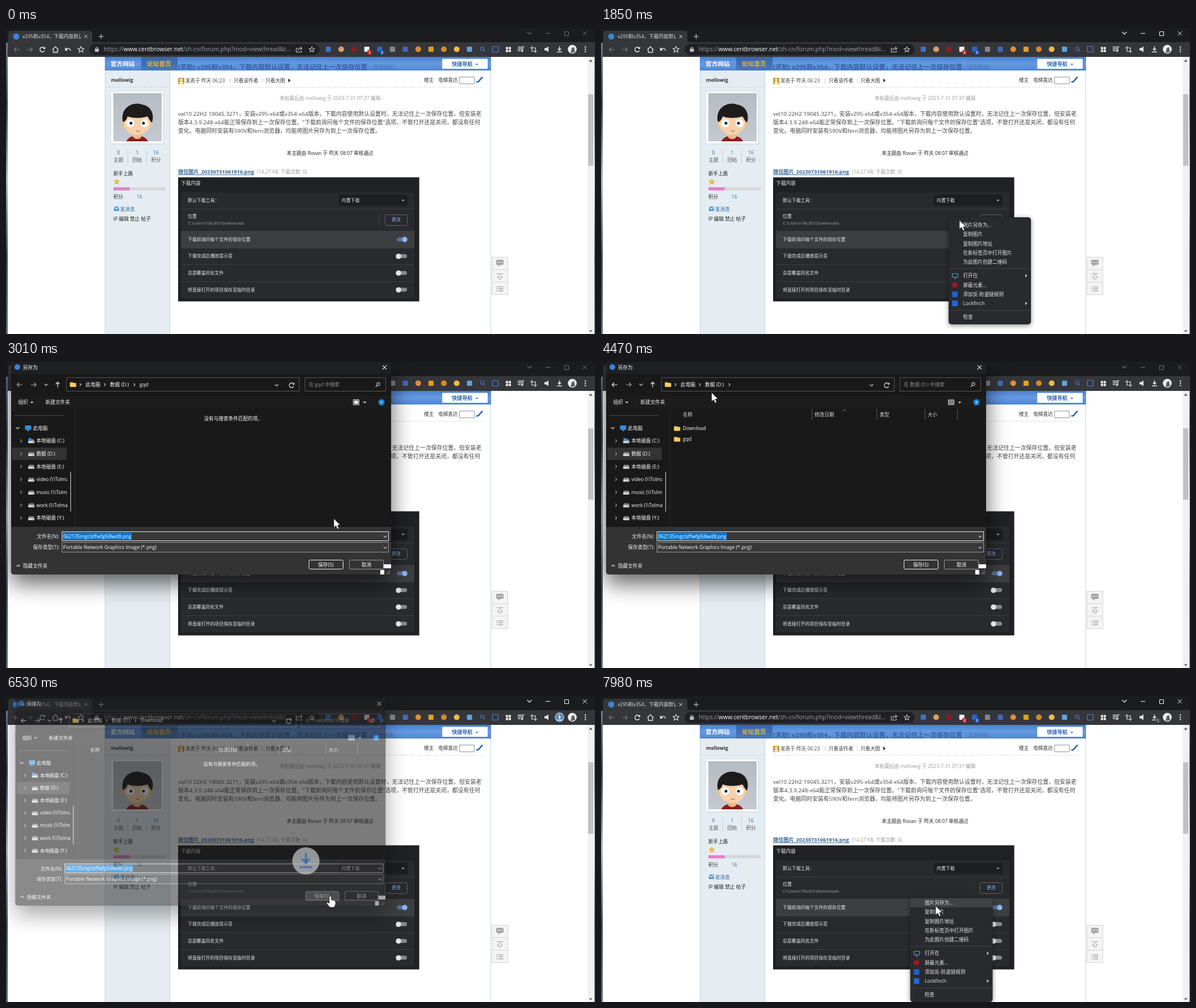
These frames come from a looping animation (1037x540 px, 8 s). An HTML page with a canvas:

```html
<!DOCTYPE html>
<html lang="zh-CN">
<head>
<meta charset="utf-8">
<title>Save dialog demo</title>
<style>
html, body { margin: 0; width: 100%; height: 100%; overflow: hidden; background: #fff; }
canvas { display: block; width: 1037px; height: 540px; }
</style>
</head>
<body>
<canvas id="stage"></canvas>
<script>
const W = 1037, H = 540, LOOP = 8000;
const FONT = '"Open Sans", "Noto Sans CJK SC", "Noto Sans CJK JP", "Noto Sans CJK", sans-serif';
const dpr = window.devicePixelRatio || 1;

function prepare(c) {
  c.width = W * dpr;
  c.height = H * dpr;
  return c.getContext('2d');
}
const stage = document.getElementById('stage');
const layer = document.createElement('canvas');
const main = prepare(stage), sub = prepare(layer);
let g = main;

// ---- drawing helpers ----
// y is the visual middle of the glyphs
function txt(s, x, y, size, color, weight = 400, align = 'left') {
  g.font = `${weight} ${size}px ${FONT}`;
  g.textAlign = align;
  g.fillStyle = color;
  g.fillText(s, x, y + size * 0.36);
  return g.measureText(s).width;
}
function shape(x, y, w, h, r) {
  g.beginPath();
  g.roundRect(x, y, w, h, r);
}
function box(x, y, w, h, color, r = 0) {
  shape(x, y, w, h, r);
  g.fillStyle = color;
  g.fill();
}
function frame(x, y, w, h, color, r = 0, lw = 1) {
  shape(x + 0.5, y + 0.5, w - 1, h - 1, r);
  g.strokeStyle = color;
  g.lineWidth = lw;
  g.stroke();
}
function dot(x, y, r, color) {
  g.beginPath();
  g.arc(x, y, r, 0, 7);
  g.fillStyle = color;
  g.fill();
}
function ring(x, y, r, color, lw = 1, from = 0, to = 6.3) {
  g.beginPath();
  g.arc(x, y, r, from, to);
  g.strokeStyle = color;
  g.lineWidth = lw;
  g.stroke();
}
// p is a flat list of offsets from x, y
function trace(x, y, p) {
  g.beginPath();
  for (let i = 0; i < p.length; i += 2) g.lineTo(x + p[i], y + p[i + 1]);
}
function line(x, y, p, color, lw = 1) {
  trace(x, y, p);
  g.strokeStyle = color;
  g.lineWidth = lw;
  g.stroke();
}
function poly(x, y, p, color) {
  trace(x, y, p);
  g.fillStyle = color;
  g.fill();
}
function vgrad(y0, y1, ...stops) {
  const gr = g.createLinearGradient(0, y0, 0, y1);
  stops.forEach((c, i) => gr.addColorStop(i / (stops.length - 1), c));
  return gr;
}
function dashed(x0, x1, y, color) {
  g.setLineDash([2, 2]);
  line(x0, y + 0.5, [0, 0, x1 - x0, 0], color);
  g.setLineDash([]);
}
function star(x, y, r, color, fill) {
  const p = [];
  for (let i = 0; i <= 10; i++) {
    const a = i * Math.PI / 5, q = i % 2 ? r * 0.45 : r;
    p.push(q * Math.sin(a), -q * Math.cos(a));
  }
  if (fill) poly(x, y, p, fill);
  line(x, y, p, color, 1.1);
}
const cross = (x, y, r, c, lw = 1) => {
  line(x, y, [-r, -r, r, r], c, lw);
  line(x, y, [r, -r, -r, r], c, lw);
};
const arrow = (x, y, dir, c) => {
  const s = 4.5 * dir;
  line(x, y, [-s, 0, s, 0], c, 1.2);
  line(x, y, [s - 3.5 * dir, -3.5, s, 0, s - 3.5 * dir, 3.5], c, 1.2);
};
const caret = (x, y, c, s = 3) => poly(x, y, [-s, -s / 2, s, -s / 2, 0, s / 2], c);
const chevron = (x, y, c, s = 3) => line(x, y, [-s, -s / 2, 0, s / 2, s, -s / 2], c, 1.1);
const chevRight = (x, y, c, s = 3) => line(x, y, [-s / 2, -s, s / 2, 0, -s / 2, s], c, 1.1);
const lens = (x, y, c) => {
  ring(x, y - 1, 3, c, 1.2);
  line(x, y, [2, 1.2, 4.5, 3.8], c, 1.3);
};
function reload(x, y, c) {
  ring(x, y, 4.2, c, 1.4, 0.5, 5.6);
  poly(x, y, [1, -1, 5, -1, 5, -5], c);
}
function download(x, y, c, s = 1) {
  line(x, y, [0, -5 * s, 0, 2 * s], c, 1.5 * s);
  poly(x, y, [-3.6 * s, -1 * s, 3.6 * s, -1 * s, 0, 3 * s], c);
  line(x, y, [-4.5 * s, 4.8 * s, 4.5 * s, 4.8 * s], c, 1.4 * s);
}

// ---- timing ----
const clamp = v => Math.max(0, Math.min(1, v));
const ramp = (t, a, b) => clamp((t - a) / (b - a));
const ease = p => p * p * (3 - 2 * p);
const mix = (a, b, p) => a + (b - a) * p;

const PATH = [
  [140, 1010, 525], [560, 791, 351], [810, 791, 351], [1010, 613, 335],
  [1640, 613, 335], [2200, 669, 347], [2680, 669, 347], [3010, 577, 276],
  [3290, 600, 310], [4130, 198, 39], [4340, 198, 39], [4800, 180, 113],
  [5160, 180, 113], [5570, 483, 215], [5900, 571, 353], [6690, 571, 353],
  [7020, 604, 412], [7500, 538, 350], [7570, 545, 357], [7790, 545, 357], [7970, 589, 370]
];
function cursorAt(t) {
  let i = 0;
  while (i < PATH.length - 2 && t > PATH[i + 1][0]) i++;
  const [a, x, y] = PATH[i], [b, u, v] = PATH[i + 1];
  const p = ease(ramp(t, a, b));
  return [mix(x, u, p), mix(y, v, p)];
}

// ---- browser window ----
function toolbar(t) {
  const focused = (t >= 880 && t < 2530) || t >= 6460;
  const white = '#e8eaed', dim = '#77797d';
  box(0, 0, W, 26, '#1b1c1e');
  box(4, 5, 148, 25, '#35363a', 5);
  box(3, 25, 1034, 26, '#35363a');
  dot(18, 15, 5.5, '#3b83d6');
  g.save();
  shape(28, 6, 104, 18, 0);
  g.clip();
  txt('v295和v354，下载内容默认设置', 29, 15, 8.6, '#dfe1e5');
  g.restore();
  cross(140.5, 15, 2.6, white);
  line(167.5, 15, [-4.5, 0, 4.5, 0], '#c8cace', 1.1);
  line(167.5, 15, [0, -4.5, 0, 4.5], '#c8cace', 1.1);

  const ctl = focused ? '#fff' : '#717276';
  chevron(921.5, 9, ctl, 4);
  line(954, 9.5, [-4, 0, 4, 0], ctl);
  frame(983, 6, 8, 8, ctl);
  cross(1019, 9.5, 3.6, ctl);

  arrow(19, 38, -1, dim);
  arrow(42, 38, 1, dim);
  reload(64, 38, white);
  line(87, 38, [-5.5, 0.5, 0, -5, 5.5, 0.5], white, 1.3);
  line(87, 38, [-3.7, 0, -3.7, 5, 3.7, 5, 3.7, 0], white, 1.3);
  g.beginPath();
  g.arc(109, 41, 5, 3.7, 6.1);
  g.strokeStyle = white;
  g.stroke();
  poly(104, 36, [0, -2, 0, 4, 5, 3.5], white);
  star(132, 38, 5.6, white);

  box(147, 28, 405, 20, '#202124', 10);
  box(156.5, 36.5, 7, 5.5, '#bdc1c6', 1);
  ring(160, 36.5, 2.2, '#bdc1c6', 1.1, 3.14, 6.29);
  let x = 172;
  x += txt('https://', x, 37.5, 10.3, '#9aa0a6');
  x += txt('www.centbrowser.net', x, 37.5, 10.3, '#fff');
  txt('/zh-cn/forum.php?mod=viewthread&t...', x, 37.5, 10.3, '#9aa0a6');
  line(516, 38, [-2, -2, -5, -2, -5, 4.5, 4, 4.5, 4, 2], '#c4c7cc', 1.1);
  line(516, 38, [-2, 2, 0, -2, 4.5, -2], '#c4c7cc', 1.1);
  line(516, 38, [2, -4.5, 5, -2, 2, 0.5], '#c4c7cc', 1.1);
  star(538.5, 38, 5, '#c4c7cc');

  // extension buttons as plain marks
  const marks = [
    ['#3f73c6', 0], ['#d9a066', 1], ['#8c1c22', 1], ['#f1f1f1', 0], ['#2d64cf', 0],
    ['#85878c', 0], ['#4468c0', 0], ['#e08d35', 1], ['#e2a01e', 0], ['#d58a2c', 1],
    ['#eebb45', 1], ['#62a3dc', 0]
  ];
  marks.forEach(([c, round], i) => {
    const mx = 567.5 + i * 22.6;
    if (round) dot(mx, 37.5, 5, c);
    else box(mx - 4.5, 33, 9, 9, c, 1);
  });
  for (const bx of [640, 662]) {
    box(bx - 4, 39, 8, 8, bx < 650 ? '#c5221f' : '#1c56b0', 2);
    txt('1', bx, 43.2, 6.8, '#fff', 700, 'center');
  }
  lens(838.5, 37.5, '#4a78c8');
  frame(856, 32, 11, 11, '#4d7fe0', 1, 1.2);
  for (const dx of [0, 5]) for (const dy of [0, 5]) box(880 + dx, 33.5 + dy, 4, 4, white);
  for (const dy of [0, 3, 6]) box(901, 33 + dy, dy > 5 ? 5 : 8, 1.4, white);
  line(910, 33, [3, 0, 0, 0, 0, 7], white, 1.2);
  dot(908.6, 40.5, 1.8, white);
  line(929, 38, [-3, -6, -3, 3, 6, 3], white, 1.2);
  line(929, 38, [-6, -3, 3, -3, 3, 6], white, 1.2);
  poly(952, 37.5, [-4, -2, -1, -2, 3, -5, 3, 5, -1, 2, -4, 2], white);

  const ringed = t >= 6460 && t < 7300;
  if (ringed) {
    dot(974.5, 37.5, 8, '#5b7da3');
    ring(974.5, 37.5, 7.5, '#a9cdf5', 1.3);
  }
  download(974.5, 37.5, white);
  if (t >= 7300) {
    box(976.5, 39, 8, 8, '#4c4e52', 2);
    txt('1', 980.5, 43.2, 6.8, '#fff', 400, 'center');
  }
  dot(997, 37.5, 7.8, '#eceded');
  poly(997, 37.5, [-3, 7, -1, -2, 3, -4, 5, 5], '#5d6066');
  for (const dy of [-4, 0, 4]) dot(1020, 37.5 + dy, 1.2, white);
}

function avatar() {
  box(184.5, 111.5, 93.5, 93.5, 'rgba(120,140,155,.3)', 1);
  box(185, 112, 92, 92, '#fff');
  box(189, 115, 85, 85, vgrad(115, 200, '#b4bcc3', '#c4cacf'));
  g.save();
  shape(189, 115, 85, 85, 0);
  g.clip();
  const blob = (x, y, rx, ry, c) => {
    g.beginPath();
    g.ellipse(x, y, rx, ry, 0, 0, 7);
    g.fillStyle = c;
    g.fill();
  };
  blob(231, 204, 20, 14, '#8f1c1b');
  blob(231, 190, 8, 6, '#eab98f');
  blob(208, 169, 4, 6, '#eebd94');
  blob(254, 169, 4, 6, '#eebd94');
  blob(231, 168, 23, 21, '#f6d1ab');
  g.beginPath();
  g.moveTo(206, 166);
  g.bezierCurveTo(200, 142, 222, 129, 239, 135);
  g.bezierCurveTo(255, 137, 262, 152, 257, 167);
  g.bezierCurveTo(253, 164, 252, 160, 249, 156);
  g.bezierCurveTo(236, 160, 222, 159, 214, 156);
  g.bezierCurveTo(213, 160, 211, 164, 206, 166);
  g.fillStyle = '#1d1b1c';
  g.fill();
  for (const ex of [219, 244]) {
    blob(ex, 168, 7, 7, '#fff');
    dot(ex + (ex < 230 ? 1 : -2), 168, 2.5, '#17191b');
  }
  ring(232, 179, 3.5, '#a35b45', 1.1, 0.5, 2.6);
  g.restore();
}

function sidebar() {
  box(174, 51, 115, 489, '#c2d5e3');
  box(175, 51, 113, 489, '#e5edf2');
  txt('mellowig', 185, 92, 8.6, '#333', 700);
  dashed(175, 288, 104, '#c3cdd4');
  avatar();
  [['0', '主题', 198], ['1', '回帖', 231], ['16', '积分', 264]].forEach(([n, s, x]) => {
    txt(n, x, 219.5, 8.6, '#336699', 400, 'center');
    txt(s, x, 233, 8.6, '#555', 400, 'center');
  });
  box(214, 213, 1, 26, '#c5d0d8');
  box(247, 213, 1, 26, '#c5d0d8');
  txt('新手上路', 189, 256.5, 8.6, '#222');
  star(195, 271.5, 4.5, '#d9a11a', '#ffd94a');
  box(189, 281, 92, 5.5, '#d6d7d9', 1);
  box(189, 281, 29, 5.5, '#e780c8', 1);
  txt('积分', 189, 298, 8.6, '#333');
  txt('16', 230, 298, 8.6, '#336699');
  box(190, 315, 9, 8, '#4b9bd8', 1);
  line(190, 315, [0.5, 1, 4.5, 4.5, 8.5, 1], '#fff', 1.1);
  txt('发消息', 201, 320, 8.6, '#336699');
  txt('IP 编辑 禁止 帖子', 189, 336.5, 8.6, '#222');
}

function settings() {
  const white = '#e8eaed', rule = '#3b3c40';
  box(303, 263.5, 424.6, 219, '#202124');
  txt('下载内容', 308, 273.5, 8.7, white);
  box(308, 290, 411, 187, '#292a2d', 4);
  box(308, 358, 411, 30, '#3d3e41');
  for (const y of [319, 358, 388, 417, 447]) box(308, y, 411, 1, rule);
  txt('默认下载工具：', 320, 304, 7.9, white);
  box(586, 294, 121, 20, '#1d1e21', 3);
  txt('内置下载', 591, 304, 7.9, white);
  caret(699, 304.5, '#9aa0a6');
  txt('位置', 320, 332, 7.9, white);
  txt('C:\\Users\\TALBO\\Downloads', 320, 344.5, 7.7, '#9aa0a6');
  box(656, 329, 1, 20, rule);
  frame(667, 329, 40, 20, '#5f6368', 3);
  txt('更改', 687, 338.5, 7.9, '#8ab4f8', 400, 'center');
  ['下载前询问每个文件的保存位置', '下载完成后播放提示音', '总是覆盖同名文件', '将直接打开的项目保存至临时目录']
    .forEach((s, i) => {
      const y = 373 + i * 29.6;
      txt(s, 320, y, 7.9, white);
      box(688, y - 3.5, 18, 7, i ? '#86888b' : '#5b6f96', 3.5);
      dot(i ? 691 : 702, y + 0.3, 4.7, i ? '#e3e4e6' : '#8ab4f8');
    });
}

function page() {
  box(0, 0, W, H, vgrad(0, H, '#7e8d9b', '#2f3a45', '#a9b4bd', '#39444f', '#5a6670'));
  box(3, 51, 1033, 489, '#fff');
  sidebar();
  box(853, 51, 1, 489, '#c2d5e3');

  box(174, 51, 680, 24, vgrad(51, 75, '#4a80d0', '#659ae2', '#5187d4'));
  box(238, 51, 64, 24, vgrad(51, 75, '#3a65ab', '#4a78bd'));
  txt('[求助] v295和v354，下载内容默认设置，无法记住上一次保存位置', 303, 68.5, 11.3, '#3a60a0', 700);
  txt('[复制链接]', 645, 69, 8.6, '#4a74b8');
  txt('官方网站', 184, 63, 10.7, '#fff', 700);
  txt('论坛首页', 248, 63, 10.7, '#f2b32c', 700);
  box(768, 54.5, 80, 17.5, '#fff', 1);
  txt('快捷导航', 785, 63.5, 9.1, '#2b62b0', 700);
  caret(829, 64.5, '#2b62b0', 2.6);

  box(303, 88, 11, 11, '#c79a2b', 1);
  dot(308.5, 91.5, 2.3, '#fff6d2');
  box(305, 94.5, 7, 4, '#fff6d2', 2);
  txt('发表于 昨天 06:23', 316, 92.5, 8.6, '#444');
  box(394, 89, 1, 8, '#ccc');
  txt('只看该作者', 401, 92.5, 8.6, '#333');
  box(451, 89, 1, 8, '#ccc');
  txt('只看大图', 457, 92.5, 8.6, '#333');
  poly(497, 92.5, [0, -3.5, 4, 0, 0, 3.5], '#333');
  txt('楼主', 736, 92, 8.6, '#333');
  txt('电梯直达', 761, 92, 8.6, '#333');
  frame(798, 86, 27, 13, '#8f9296');
  line(833, 91.5, [-5, 4, -1, 3, 3, -2, 6, -5], '#2a62b4', 2.6);
  dashed(303, 840, 104, '#cdcdcd');

  txt('本帖最后由 mellowig 于 2023-7-31 07:37 编辑', 570.5, 124, 8.6, '#999', 400, 'center');
  ['vel10 22H2 19045.3271，安装v295-x64或v354-x64版本，下载内容使用默认设置时，无法记住上一次保存位置，但安装老',
   '版本4.3.9.248-x64能正常保存到上一次保存位置。"下载前询问每个文件的保存位置"选项，不管打开还是关闭，都没有任何',
   '变化。电脑同时安装有590V和fern浏览器，均能将图片另存为到上一次保存位置。']
    .forEach((s, i) => txt(s, 303, 151 + i * 15, 9.85, '#444'));
  txt('本主题由 Rovan 于 昨天 08:07 审核通过', 570.5, 221, 8.6, '#222', 400, 'center');
  const w = txt('微信图片_20230731061916.png', 303, 254, 9.2, '#336699', 700);
  box(303, 258.5, w, 1, '#336699');
  txt('(14.27 KB, 下载次数: 0)', 442, 254, 8.6, '#999');
  settings();

  // floating buttons
  for (let i = 0; i < 3; i++) {
    box(855, 404 + i * 22, 29, 22, '#f4f4f4');
    frame(855, 404 + i * 22, 29, 23, '#d4d4d4');
  }
  const grey = '#a4a4a4';
  box(863, 409, 13, 9, grey, 2);
  poly(866, 417, [0, 0, 5, 0, 1, 4], grey);
  for (const dx of [866, 869.5, 873]) dot(dx, 413.5, 0.9, '#fff');
  box(864, 433, 11, 1.2, grey);
  line(869.5, 436, [-5, 4, 0, 0, 5, 4, 2, 4, 2, 7, -2, 7, -2, 4, -5, 4], grey);
  for (const y of [456, 459.5, 463]) {
    box(863.5, y, 2, 1.5, grey);
    box(867, y, 8.5, 1.5, grey);
  }

  box(1024, 51, 12, 489, '#f1f1f1');
  box(1025, 117, 9, 126, '#c1c1c1');
  poly(1029.5, 57.5, [-3, 2, 3, 2, 0, -2], '#505050');
  caret(1029.5, 535, '#505050');
}

// ---- context menu ----
const ITEMS = [
  ['图片另存为...', 0], ['复制图片', 16.2], ['复制图片地址', 32.5], ['在新标签页中打开图片', 49], ['为此图片创建二维码', 65],
  ['打开在', 89], ['屏蔽元素...', 105.5], ['添加反-防盗链规则', 122], ['Lockfinch', 138], ['检查', 162]
];
function menu(x, top, first, [cx, cy]) {
  g.save();
  g.shadowColor = 'rgba(0,0,0,.45)';
  g.shadowBlur = 8 * dpr;
  g.shadowOffsetY = 2 * dpr;
  box(x, top, 145, first + 175 - top, '#292a2d', 5);
  g.restore();
  for (const [s, dy] of ITEMS) {
    const y = first + dy;
    if (cx >= x && cx < x + 145 && Math.abs(cy - y) < 8) box(x, y - 8, 145, 16, '#414246');
    txt(s, x + 25.5, y, 8.6, '#e8eaed');
  }
  box(x, first + 76, 145, 1, '#404145');
  box(x, first + 150, 145, 1, '#404145');
  const ix = x + 11;
  frame(ix - 5, first + 85, 11, 7, '#5c9fd4', 1, 1.1);
  box(ix - 2, first + 93, 5, 1.2, '#5c9fd4');
  dot(ix, first + 105.5, 5, '#9c1a20');
  box(ix - 5, first + 117, 10, 10, '#2260cf', 1);
  box(ix - 5, first + 133, 10, 10, '#2565d8', 1);
  for (const dy of [89, 138]) poly(x + 135, first + dy, [0, -3, 3.5, 0, 0, 3], '#c9cbce');
}

// ---- save dialog ----
function drive(x, y, blue) {
  poly(x, y, [-4, -3, 4, -3, 5.5, 0, -5.5, 0], '#85888c');
  box(x - 5.5, y, 11, 4, '#d5d7da', 1);
  box(x + 2, y + 1.5, 2, 1, '#3a8f52');
  if (blue) box(x - 5, y - 5, 5, 5, '#2f8fe6');
}
function folder(x, y) {
  box(x - 5.5, y - 4, 6, 4, '#d79a2a', 1);
  box(x - 5.5, y - 2.5, 11, 7, '#f7cd62', 1);
}
function tree() {
  box(15, 94, 87, 1, '#4a4a4a');
  chevron(20.5, 116.5, '#ddd');
  box(33.5, 112, 11, 7.5, '#2f8fe0', 1);
  box(37, 120, 4, 1.5, '#8fa3b5');
  txt('此电脑', 47.5, 116.5, 8.6, '#fff');
  box(11, 151, 96, 22, '#333');
  g.save();
  shape(9, 82, 99, 205, 0);
  g.clip();
  ['本地磁盘 (C:)', '数据 (D:)', '本地磁盘 (E:)', 'video (\\\\Tolmar)', 'music (\\\\Tolmar)', 'work (\\\\Tolmar)', '本地磁盘 (Y:)']
    .forEach((s, i) => {
      const y = 139.3 + i * 22.65;
      chevRight(26.5, y, '#9a9a9a', 2.7);
      drive(44.5, y, i === 0);
      txt(s, 53.5, y, 8.6, '#fff');
    });
  g.restore();
  box(113, 194, 1.5, 70, '#a0a0a0');
  box(121, 83, 1, 208, '#2c2c2c');
}
function listing(dir, t) {
  const empty = '没有与搜索条件匹配的项。';
  if (dir === 'gqd') return txt(empty, 348.5, 99.5, 8.6, '#fff');
  [['名称', 144, 371], ['修改日期', 376, 485], ['类型', 490.5, 570], ['大小', 575, 627]].forEach(([s, x, end]) => {
    txt(s, x, 92.5, 8.6, '#dcdcdc');
    box(end, 83, 1, 19, '#5b5b5b');
  });
  line(428.5, 85, [-2.5, -1, 0, 1, 2.5, -1], '#999');
  if (dir) return txt(empty, 348.5, 118.5, 8.6, '#fff');
  if (t > 4780) box(126, 108, 500, 19, '#3a3a3a');
  ['Download', 'gqd'].forEach((s, i) => {
    folder(134, 117 + i * 19);
    txt(s, 144, 117 + i * 19, 8.6, '#fff');
  });
}
function dialog(t) {
  const dir = t < 4270 ? 'gqd' : t < 5090 ? '' : 'Download';
  const picked = t < 5090 || t >= 6390;
  const white = '#f3f3f3';
  g.save();
  g.shadowColor = 'rgba(0,0,0,.62)';
  g.shadowBlur = 38 * dpr;
  g.shadowOffsetY = 16 * dpr;
  box(9, -1, 669, 376, '#191919', 5);
  g.restore();
  shape(9, -1, 669, 376, 5);
  g.save();
  g.clip();
  box(9, -1, 669, 22, '#1f2022');
  box(9, 60, 669, 22, '#1c1c1c');
  dot(20, 9, 5, '#3b83d6');
  txt('另存为', 29.5, 9.5, 8.8, '#fff');
  cross(666.5, 9.5, 3.6, white, 1.1);

  arrow(24, 40, -1, dir === 'gqd' ? '#a8a8a8' : white);
  arrow(48.5, 40, 1, '#a8a8a8');
  chevron(70.5, 40, '#ccc');
  line(91, 40, [0, 4.5, 0, -4.5], white, 1.2);
  line(91, 40, [-3.5, -1, 0, -4.5, 3.5, -1], white, 1.2);
  frame(106, 27, 411, 25, '#555');
  frame(526, 27, 143, 25, '#555');
  folder(118, 39.5);
  [['此电脑', 140, 131], ['数据 (D:)', 183, 174], [dir, 235, 226]].forEach(([s, x, c]) => {
    chevRight(c, 40, '#d0d0d0', 2.3);
    txt(s, x, 39.5, 8.7, '#fff');
  });
  chevron(476.5, 41, '#d0d0d0');
  reload(503, 41, '#d0d0d0');
  txt(`在 ${dir || '数据 (D:)'} 中搜索`, 533, 40, 8.6, '#8e8e8e');
  ring(655.5, 39, 2.6, '#c4c4c4', 1.1);
  line(654, 41, [0, 0, -3.2, 3], '#c4c4c4', 1.2);

  txt('组织', 21.5, 71, 8.6, white);
  caret(45.5, 71.5, '#d0d0d0');
  txt('新建文件夹', 69.5, 71, 8.6, white);
  if (dir === 'gqd') {
    frame(611, 66, 11, 10, white);
    box(613, 68, 7, 6, white);
  } else {
    frame(611, 66, 11, 10, '#bbb');
    for (const y of [68, 70.5, 73]) box(612, y, 9, 1.3, '#ddd');
  }
  caret(631.5, 71.5, '#d0d0d0');
  dot(661, 71, 5.5, '#1683d8');
  txt('?', 661, 71, 7.5, '#fff', 700, 'center');

  tree();
  listing(dir, t);

  box(9, 291, 669, 85, '#333334');
  txt('文件名(N):', 94, 308, 8.6, white, 400, 'right');
  txt('保存类型(T):', 94, 327, 8.6, white, 400, 'right');
  box(98, 299, 576, 17, '#383838');
  box(98, 318, 576, 18, '#383838');
  frame(98, 299, 576, 17, picked ? '#f0f0f0' : '#9b9b9b');
  frame(98, 318, 576, 18, '#9b9b9b');
  const name = '062135mgclsffwfgl68wd8.png';
  g.font = `400 8.7px ${FONT}`;
  if (picked) box(100, 301, g.measureText(name).width + 1, 13, '#0078d7');
  txt(name, 100.5, 307.5, 8.7, '#fff');
  txt('Portable Network Graphics Image (*.png)', 100.5, 326.8, 8.6, '#fff');
  chevron(667.5, 308, '#ccc', 2.7);
  chevron(667.5, 327.5, '#ccc', 2.7);
  line(21.5, 359.5, [-3, 1.5, 0, -1.5, 3, 1.5], '#ddd', 1.1);
  txt('隐藏文件夹', 30, 359.5, 8.6, white);
  box(533, 349, 61, 17, t >= 6390 ? '#666' : '#333', 2);
  frame(533, 349, 61, 17, t >= 6390 ? '#aaa' : '#f0f0f0', 2);
  txt('保存(S)', 563, 357.5, 8.6, '#fff', 400, 'center');
  frame(604, 349, 61, 17, '#9b9b9b', 2);
  txt('取消', 634.5, 357.5, 8.6, '#fff', 400, 'center');
  box(665, 357, 13, 7, '#fff');
  box(659, 367, 7, 9, '#fff');
  for (let i = 0; i < 3; i++) for (let j = 0; j <= i; j++) box(670 + i * 2.2, 373 - j * 2.2, 1.2, 1.2, '#aaa');
  g.restore();
}
function showDialog(t) {
  if (t < 2670 || t >= 6670) return;
  const opening = ease(ramp(t, 2670, 2870)), closing = ramp(t, 6390, 6670);
  const zoom = mix(0.93, 1, opening) - 0.051 * closing;
  g = sub;
  g.setTransform(dpr, 0, 0, dpr, 0, 0);
  g.clearRect(0, 0, W, H);
  g.translate(300 * (1 - zoom), 174 * (1 - zoom));
  g.scale(zoom, zoom);
  dialog(t);
  g = main;
  g.globalAlpha = opening * (1 - 0.86 * closing);
  g.drawImage(layer, 0, 0, W, H);
  g.globalAlpha = 1;
}

// badge that flies from the page centre to the toolbar
function flyer(t) {
  if (t < 6460 || t >= 7570) return;
  const p = Math.pow(ramp(t, 6600, 7600), 1.6);
  const r = mix(24, 17, p);
  const x = mix(528, 974, p), y = mix(291, 37, p);
  g.globalAlpha = 0.95 * ramp(t, 6430, 6570) * (1 - 0.6 * ramp(t, 7200, 7570));
  dot(x, y, r, '#c9ccd1');
  download(x, y - 1, '#2f66b0', r / 9.6);
  g.globalAlpha = 1;
}

function pointer(x, y, hand) {
  g.lineJoin = 'round';
  if (hand) {
    trace(x, y, [-2, 1, 0, 0, 2, 1, 2, 7, 5, 7, 9, 9, 9.5, 14, 7, 20, -1, 20, -6.5, 13, -6, 11, -4, 11, -2, 13]);
  } else {
    trace(x, y, [0, 0, 0, 16.5, 3.8, 13, 6.5, 19, 9.4, 17.8, 6.8, 12, 11.8, 12]);
  }
  g.closePath();
  g.fillStyle = '#fff';
  g.fill();
  g.strokeStyle = '#111';
  g.lineWidth = 0.9;
  g.stroke();
  g.lineJoin = 'miter';
}

function draw(t) {
  g = main;
  g.setTransform(dpr, 0, 0, dpr, 0, 0);
  const at = cursorAt(t);
  page();
  toolbar(t);
  if (t >= 1020 && t < 2390) menu(612, 334, 348, at);
  if (t >= 7780) menu(544.5, 356, 365, at);
  showDialog(t);
  flyer(t);
  if (t >= 140) pointer(at[0], at[1], t >= 6390 && t < 6700);
}

const start = performance.now();
function tick() {
  draw((performance.now() - start) % LOOP);
  requestAnimationFrame(tick);
}
tick();
</script>
</body>
</html>
```
